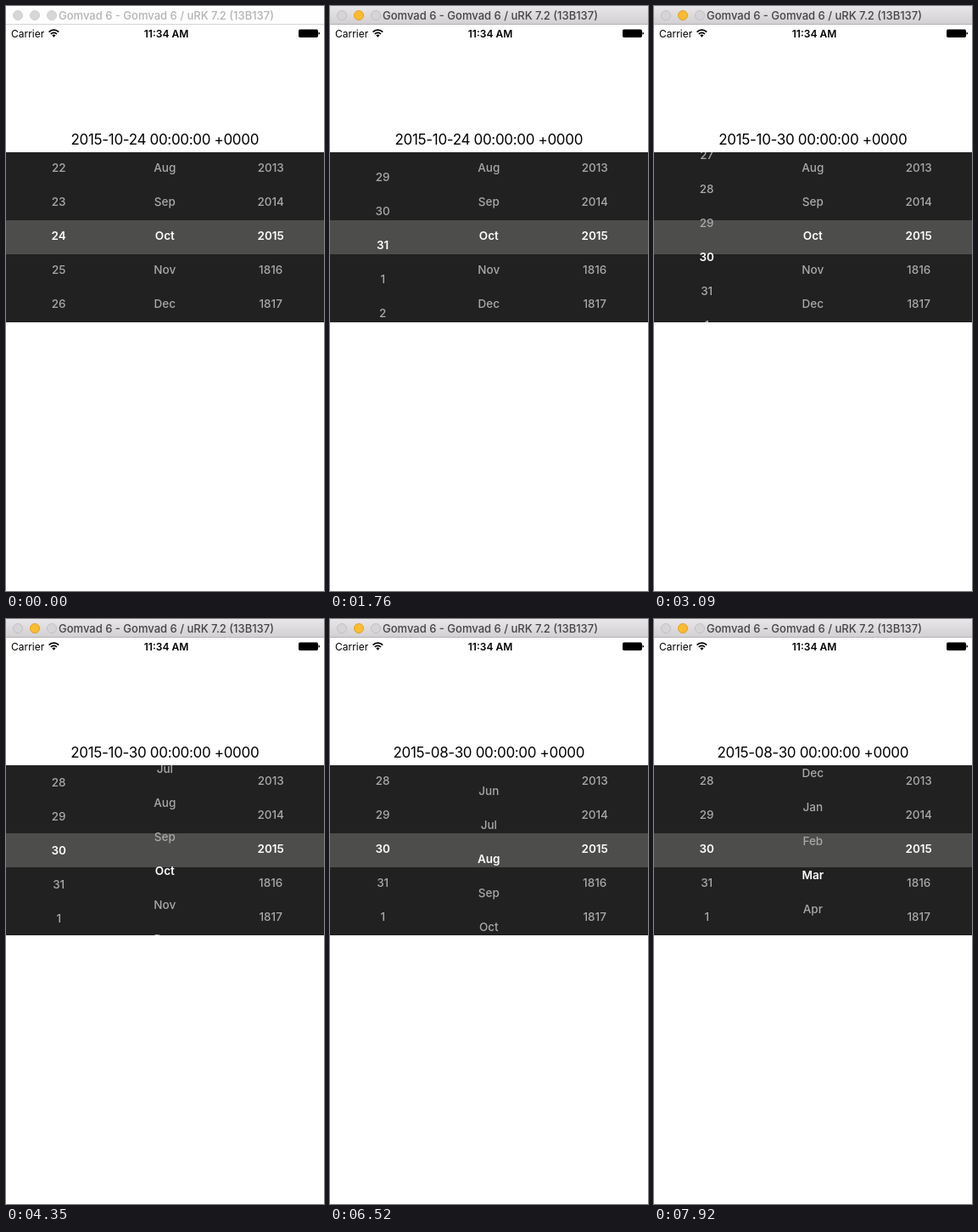
An HTML page that plays this animation: 375 px wide and 688 px high, repeating every 7990 ms.

```html
<!DOCTYPE html>
<html lang="en">
<head>
<meta charset="utf-8">
<title>Date picker</title>
<style>
  html, body { margin: 0; width: 100%; height: 100%; overflow: hidden; background: #fff; }
  svg { display: block; width: 375px; height: 688px; font-family: Inter, Roboto, sans-serif; }
  .mid { text-anchor: middle; }
  .title { font-size: 13px; font-weight: 500; fill: #b5b2b6; }
  .status { font-size: 12px; }
  .date { font-size: 17px; letter-spacing: -.33px; font-feature-settings: "calt" 0; }
  .row { font-size: 13.5px; font-weight: 500; fill: #a9a9a9; text-anchor: middle; }
  .row.on { fill: #fff; font-weight: 600; }
  .bar { fill: #fefefe; }
  .edge { fill: #d6d4d6; }
  .light { fill: #d8d6d8; stroke: #d0ced0; }
  .active .bar { fill: url(#chrome); }
  .active .edge { fill: #b4b2b4; }
  .active .title { fill: #454345; }
  .active .light { fill: #d6d4d6; stroke: #c2c0c2; }
  .active .min { fill: #fdbc30; stroke: #dfa023; }
</style>
</head>
<body>
<svg viewBox="0 0 375 688">
  <defs>
    <linearGradient id="chrome" x2="0" y2="1">
      <stop stop-color="#e9e6e9"/><stop offset="1" stop-color="#d2d0d2"/>
    </linearGradient>
    <clipPath id="panel"><rect y="172" width="375" height="200"/></clipPath>
  </defs>

  <g id="chromeBar">
    <rect class="bar" width="375" height="21"/>
    <rect class="edge" y="21" width="375" height="1"/>
    <circle class="light" cx="14" cy="11" r="5.5"/>
    <circle class="light min" cx="34" cy="11" r="5.5"/>
    <circle class="light" cx="54" cy="11" r="5.5"/>
    <text class="title mid" x="189" y="16">Gomvad 6 - Gomvad 6 / uRK 7.2 (13B137)</text>
  </g>

  <g class="status">
    <text x="6" y="37">Carrier</text>
    <g fill="none" stroke="#000" stroke-width="1.7">
      <path d="M50.6 30.6a8 8 0 0 1 11.6 0M52.8 33a5 5 0 0 1 7.2 0"/>
    </g>
    <path d="M54.3 34.6a3 3 0 0 1 4.2 0l-2.1 2.2z"/>
    <text class="mid" x="189" y="37" font-weight="600">11:34 AM</text>
    <rect x="345" y="27.5" width="23" height="9.5" rx="1.8"/>
    <path d="M368.5 30.6q1.5 .4 1.5 1.6t-1.5 1.6z"/>
  </g>

  <text id="date" class="date mid" x="187.3" y="163"></text>

  <rect y="172" width="375" height="200" fill="#212121"/>
  <rect y="252" width="375" height="40" fill="#4d4d4c"/>
  <g id="wheels" clip-path="url(#panel)"></g>
</svg>
<script>
const LOOP = 7990, HOLD = 500, STEP = 70, ROW = 40, CENTER = 275;
const byId = id => document.getElementById(id);
const range = (n, from) => Array.from({ length: n }, (_, i) => i + from);

const clamp = u => Math.min(1, Math.max(0, u));
const part = (t, from, to) => clamp((t - from) / (to - from));
const easeOut = u => 1 - (1 - u) ** 2;
const easeInOut = u => u < .5 ? 2 * u * u : 1 - 2 * (1 - u) ** 2;
const coast = (end, left, ms, tau) => end - left * Math.exp(-ms / tau);
const mix = (a, b, u) => a + (b - a) * u;

// Hermite curve from a to b with slopes m and n per unit
const hermite = (a, b, m, n, u) =>
  a + (b - a) * u * u * (3 - 2 * u) + m * u * (1 - u) ** 2 - n * u * u * (1 - u);

// Distance in px that each wheel has been pulled down
function dayPull(t) {
  if (t < 1200) return hermite(0, 846, 220, 286, part(t, 430, 1200));
  if (t < 3020) return coast(1032, 186, t - 1200, 500);
  if (t < 5150) return mix(1027, 1002, easeInOut(part(t, 3020, 3370)));
  return mix(1002, 1000, easeInOut(part(t, 5150, 5470)));
}

function monthPull(t) {
  if (t < 4350) return 26 * part(t, 4280, 4350);
  if (t < 5150) return mix(26, 115, easeOut(part(t, 4350, 4840)));
  if (t < 6450) return mix(115, 80, easeInOut(part(t, 5150, 5470)));
  if (t < 7010) return hermite(80, 246, 80, 168, part(t, 6450, 7010));
  return coast(312, 66, t - 7010, 220);
}

function makeWheel(x, items, start, pull) {
  const rows = range(6, -3).map(offset => {
    const el = document.createElementNS("http://www.w3.org/2000/svg", "text");
    el.setAttribute("class", offset ? "row" : "row on");
    el.setAttribute("x", x);
    byId("wheels").append(el);
    return { el, offset };
  });
  const n = items.length;
  return t => {
    const px = Math.round(pull(t));
    const top = start - Math.floor(px / ROW);
    for (const { el, offset } of rows) {
      el.textContent = items[(((top + offset) % n) + n) % n];
      el.setAttribute("y", CENTER + px % ROW + offset * ROW);
    }
  };
}

const months = "Jan Feb Mar Apr May Jun Jul Aug Sep Oct Nov Dec".split(" ");
const wheels = [
  makeWheel(62.2, range(31, 1), 23, dayPull),
  makeWheel(187.3, months, 9, monthPull),
  makeWheel(312.2, range(200, 1816), 199, () => 0)
];

function draw(t) {
  const day = t < 3020 ? "10-24" : t < 5260 ? "10-30" : "08-30";
  byId("date").textContent = `2015-${day} 00:00:00 +0000`;
  byId("chromeBar").classList.toggle("active", t >= HOLD);
  wheels.forEach(turn => turn(t));
}

const origin = performance.now();
function tick() {
  const t = (performance.now() - origin) % LOOP;
  draw(t < HOLD ? 0 : HOLD + Math.floor((t - HOLD) / STEP) * STEP);
  requestAnimationFrame(tick);
}
draw(0);
requestAnimationFrame(tick);
</script>
</body>
</html>
```
